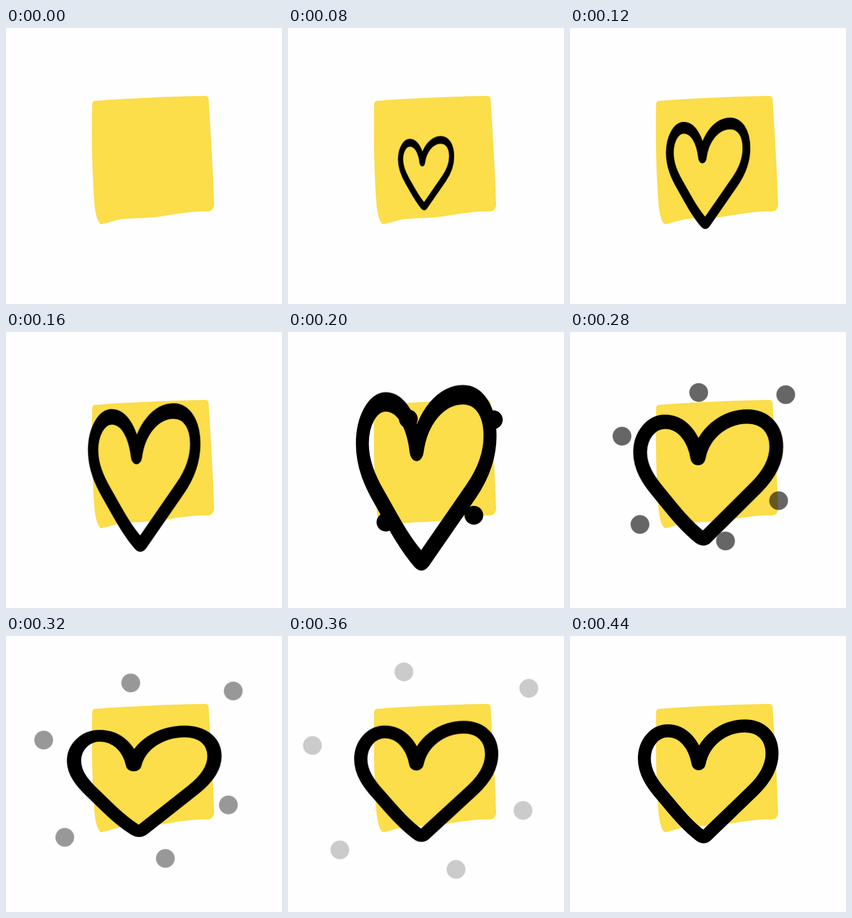
These frames come from a looping animation (500x500 px, 1040 ms). An HTML page:

```html
<!DOCTYPE html>
<html lang="en">
<head>
<meta charset="utf-8">
<title>Heart pop</title>
<style>
  html, body { margin: 0; width: 100%; height: 100%; overflow: hidden; background: #fefefe; }
  svg { display: block; width: 100vw; height: 100vh; }
  .note { fill: #fcdd4a; }

  .heart {
    fill: none;
    stroke: #000;
    stroke-width: 23.5;
    stroke-linejoin: round;
    transform-origin: 250px 262px;
    animation: pop 1040ms infinite;
  }

  /* Each dot swings a quarter circle around its own pivot while it fades. */
  .dots circle {
    r: 17px;
    opacity: 0;
    transform-origin: var(--x) var(--y);
    animation: swing 1040ms infinite, fade 1040ms infinite;
  }
  .cw { --turn: 90deg; }
  .ccw { --turn: -90deg; }
  .late { --lead: 0; }

  /* The motion ticks every 40 ms. */
  @keyframes pop {
    0% { transform: scale(0, 0); animation-timing-function: steps(5); }
    19.23% { transform: scale(1, 1.5); animation-timing-function: steps(3); }
    30.76% { transform: scale(1.1, .9); animation-timing-function: step-end; }
    34.61% { transform: scale(1.025, .978); animation-timing-function: step-end; }
    38.46% { transform: scale(1.005, .995); animation-timing-function: step-end; }
    42.3%, 100% { transform: scale(1, 1); }
  }
  @keyframes swing {
    0% { transform: rotate(0deg); }
    19.23% { transform: rotate(0deg); animation-timing-function: steps(4); }
    34.61%, 100% { transform: rotate(var(--turn)); }
  }
  @keyframes fade {
    0% { opacity: 0; animation-timing-function: step-end; }
    19.23% { opacity: var(--lead, 1); animation-timing-function: step-end; }
    23.07% { opacity: .8; animation-timing-function: steps(4); }
    38.46%, 100% { opacity: 0; }
  }
</style>
</head>
<body>
<svg viewBox="0 0 500 500">
  <path class="note" d="M156 138 Q156 132 162 132 C220 127.500 300 124 361 123 Q366.500 123 367 129
    C371 190 375 260 377 319 Q377 332 364 332.500 C340 331 310 337 272 342.500
    C250 345 225 344 208 346.500 C192 350 184 353 173 355.500 C166 355 161 333 160 315
    C156 260 155 200 156 138Z"/>
  <g class="dots">
    <circle class="ccw" cx="218" cy="157.5" style="--x:167.75px; --y:115.25px"/>
    <circle class="cw" cx="372" cy="159" style="--x:436.25px; --y:159px"/>
    <circle class="ccw late" cx="136.3" cy="217.3" style="--x:80.8px; --y:253.8px"/>
    <circle class="ccw" cx="177.4" cy="344.4" style="--x:157.15px; --y:407.65px"/>
    <circle class="ccw late" cx="297" cy="331.3" style="--x:346.5px; --y:373.3px"/>
    <circle class="cw" cx="336.7" cy="332" style="--x:389.2px; --y:368.5px"/>
  </g>
  <path class="heart" d="M232 231 C226 196 205 171.700 177 171.700 C153 171.700 134.700 195 134.700 222
    C134.700 247 149 268 165.500 287 C187 312 208 340 236 361.500 Q242 366 247 361.500 L332 279.500
    C352 260 366 238 366 213 C366 183 347 163 317 163 C278 163 242 190 234 231 Q233 232 232 231Z"/>
</svg>
</body>
</html>
```
